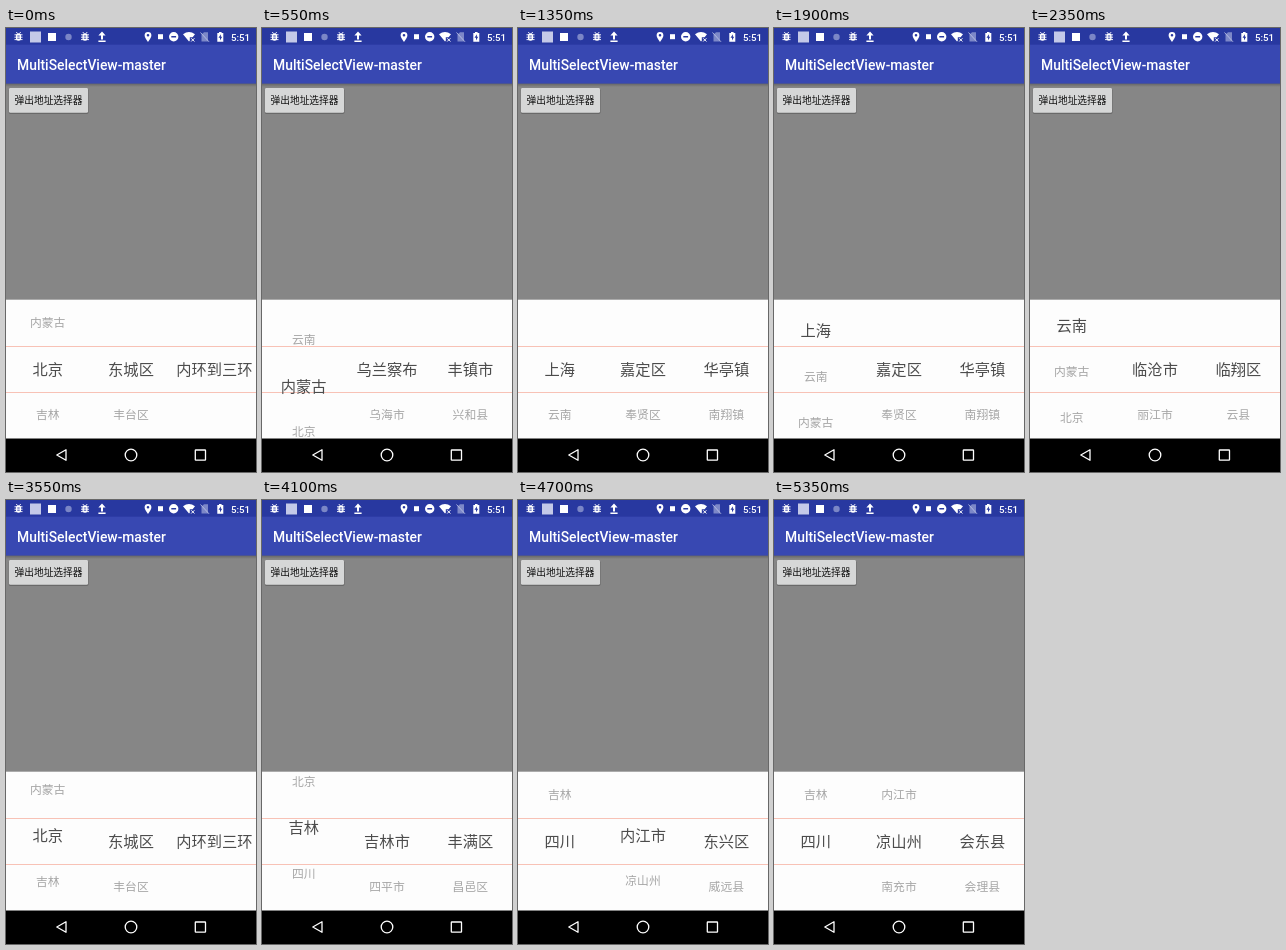
An HTML page for the animation above (5450 ms loop, 250 by 444 pixels).

```html
<!DOCTYPE html>
<html lang="zh-CN">
<head>
<meta charset="utf-8">
<title>MultiSelectView-master</title>
<style>
  html, body { margin: 0; width: 100%; height: 100%; overflow: hidden; background: #000; }
  svg { display: block; width: 100vw; height: 100vh; }
  text { font-family: 'Noto Sans CJK SC', 'Noto Sans CJK', 'Noto Sans', sans-serif; }
  .latin { font-family: Roboto, sans-serif; font-weight: 500; fill: #fff; }
  .row { text-anchor: middle; }
</style>
</head>
<body>
<svg viewBox="0 0 250 444">
  <defs>
    <linearGradient id="shade" x1="0" y1="0" x2="0" y2="1">
      <stop offset="0" stop-color="#000" stop-opacity=".28"/>
      <stop offset="1" stop-color="#000" stop-opacity="0"/>
    </linearGradient>
    <clipPath id="panel"><rect y="272" width="250" height="138.6"/></clipPath>
    <g id="bug" fill="#fff">
      <rect x="-2.5" y="-3.4" width="5" height="7.6" rx="2.5"/>
      <path d="M-4-1.8H4M-4 .6H4M-4 3H4M-2.2-4.6L-1-3M2.2-4.6L1-3" stroke="#fff" stroke-width=".9"/>
      <path d="M-1.2-.6H1.2M-1.2 1.6H1.2" stroke="#2838a0" stroke-width=".9"/>
    </g>
  </defs>

  <rect width="250" height="444" fill="#868686"/>
  <rect y="55" width="250" height="4" fill="url(#shade)"/>
  <rect width="250" height="17" fill="#2838a0"/>
  <rect y="16.7" width="250" height="38.9" fill="#3848b2"/>
  <text class="latin" x="11.1" y="41.7" font-size="13.89">MultiSelectView-master</text>

  <!-- status bar -->
  <use href="#bug" x="12.5" y="8.6"/>
  <rect x="24" y="3.5" width="11" height="11" fill="#c4c9e8"/>
  <rect x="42" y="5" width="8" height="8" fill="#fff"/>
  <circle cx="62.5" cy="9" r="3.2" fill="#7b86c6"/>
  <use href="#bug" x="79" y="8.6"/>
  <g fill="#fff">
    <path d="M96 3.4L99.6 7.4H97V11.6H95V7.4H92.4ZM92.4 12.6H99.6V13.9H92.4Z"/>
    <path fill-rule="evenodd" d="M142 14C140 11 138.6 9.3 138.6 7.3A3.4 3.4 0 0 1 145.400 7.3C145.400 9.3 144 11 142 14ZM140.700 7.3A1.3 1.3 0 0 0 143.300 7.3A1.3 1.3 0 0 0 140.700 7.3Z"/>
    <rect x="152" y="6.200" width="5" height="5"/>
    <path fill-rule="evenodd" d="M163 8.800A4.700 4.700 0 0 1 172.400 8.800A4.700 4.700 0 0 1 163 8.800ZM165.300 8.100V9.500H170.100V8.100Z"/>
    <path d="M177 6.200Q183 2 189 6.200L186.600 9.200H183.800V12.800L183 13.600Z"/>
    <path d="M185.200 10.300L188.400 13.500M188.400 10.300L185.200 13.500" stroke="#fff" stroke-width="1"/>
    <path fill-rule="evenodd" d="M211.300 5H213V4H215.600V5H217.300V13.800H211.300ZM214.900 6.200L212.500 9.800H214V12.500L216.200 8.800H214.900Z"/>
  </g>
  <path d="M195.500 6.400L198 4.200H202V13.600H195.500Z" fill="#7d88c8"/>
  <path d="M194.500 4.500L203 13.800" stroke="#b9c0e4" stroke-width=".9"/>
  <text class="latin" x="225" y="12.600" font-size="9.72">5:51</text>

  <!-- button -->
  <rect x="2.800" y="60.800" width="79.700" height="25.200" rx="1.400" fill="#000" opacity=".22"/>
  <rect x="3" y="60" width="79" height="24.800" rx="1.400" fill="#d6d7d7"/>
  <text x="42.500" y="76" font-size="9.72" text-anchor="middle" fill="#111">弹出地址选择器</text>

  <!-- picker -->
  <rect y="271.700" width="250" height="139" fill="#fdfdfd"/>
  <path d="M0 318.500H250M0 364.500H250" stroke="#f8c2b6"/>
  <g id="wheels" clip-path="url(#panel)"></g>

  <!-- navigation bar -->
  <rect y="410.600" width="250" height="33.400" fill="#000"/>
  <g fill="none" stroke="#fff" stroke-width="1.300">
    <path d="M60 421.700V432.300L50.800 427Z" stroke-linejoin="round"/>
    <circle cx="125" cy="427" r="5.800"/>
    <rect x="189.300" y="422" width="10.200" height="10.200" rx=".5"/>
  </g>
</svg>
<script>
const LOOP = 5450, STEP = 50, ROW = 46, MID = 341;
const CENTERS = [41.7, 125, 208.3];

const provinces = ['上海', '云南', '内蒙古', '北京', '吉林', '四川'];
const cities = [
  ['嘉定区', '奉贤区'], ['临沧市', '丽江市'], ['乌兰察布', '乌海市'],
  ['东城区', '丰台区'], ['吉林市', '四平市'], ['内江市', '凉山州', '南充市']
];
const districts = {
  嘉定区: ['华亭镇', '南翔镇'], 临沧市: ['临翔区', '云县'],
  乌兰察布: ['丰镇市', '兴和县'], 东城区: ['内环到三环'],
  吉林市: ['丰满区', '昌邑区'], 内江市: ['东兴区', '威远县'],
  凉山州: ['会东县', '会理县']
};

// Each swipe: start, end, time the choice takes effect, from row, to row
const provinceSwipes = [
  [0, 300, 350, 3, 2], [340, 850, 950, 2, 1], [1060, 1330, 1350, 1, 0],
  [1600, 2000, 2050, 0, 1], [2050, 2400, 2450, 1, 2], [2450, 2880, 3050, 2, 3],
  [3450, 3900, 3950, 3, 4], [3950, 4363, 4400, 4, 5]
];
const citySwipes = [[4550, 5200, 5300, 0, 1]];

const smooth = u => u * u * (3 - 2 * u);

function wheelAt(swipes, t) {
  let pos = swipes[0][3], chosen = pos;
  for (const [start, end, commit, from, to] of swipes) {
    if (t >= start) pos = from + (to - from) * smooth(Math.min(1, (t - start) / (end - start)));
    if (t >= commit) chosen = to;
  }
  return { pos, chosen };
}

const host = document.getElementById('wheels');
const wheels = CENTERS.map(x => provinces.map(() => {
  const label = document.createElementNS('http://www.w3.org/2000/svg', 'text');
  label.setAttribute('class', 'row');
  label.setAttribute('x', x);
  return host.appendChild(label);
}));

function drawWheel(labels, items, { pos, chosen }) {
  labels.forEach((label, i) => {
    const y = MID + (i - pos) * ROW;
    const shown = i < items.length && Math.abs(y - MID) < 2 * ROW;
    label.style.display = shown ? '' : 'none';
    if (!shown) return;
    const size = i === chosen ? 15.28 : 11.8;
    label.textContent = items[i];
    label.setAttribute('y', y + size * 0.38);
    label.setAttribute('font-size', size);
    label.setAttribute('fill', i === chosen ? '#4c4c4c' : '#a6a6a6');
  });
}

function draw(t) {
  const province = wheelAt(provinceSwipes, t);
  const city = wheelAt(citySwipes, t);
  const cityList = cities[province.chosen];
  drawWheel(wheels[0], provinces, province);
  drawWheel(wheels[1], cityList, city);
  drawWheel(wheels[2], districts[cityList[city.chosen]], { pos: 0, chosen: 0 });
}

const origin = performance.now();
function tick() {
  const t = (performance.now() - origin) % LOOP;
  draw(Math.floor(t / STEP) * STEP);
  requestAnimationFrame(tick);
}
tick();
</script>
</body>
</html>
```
